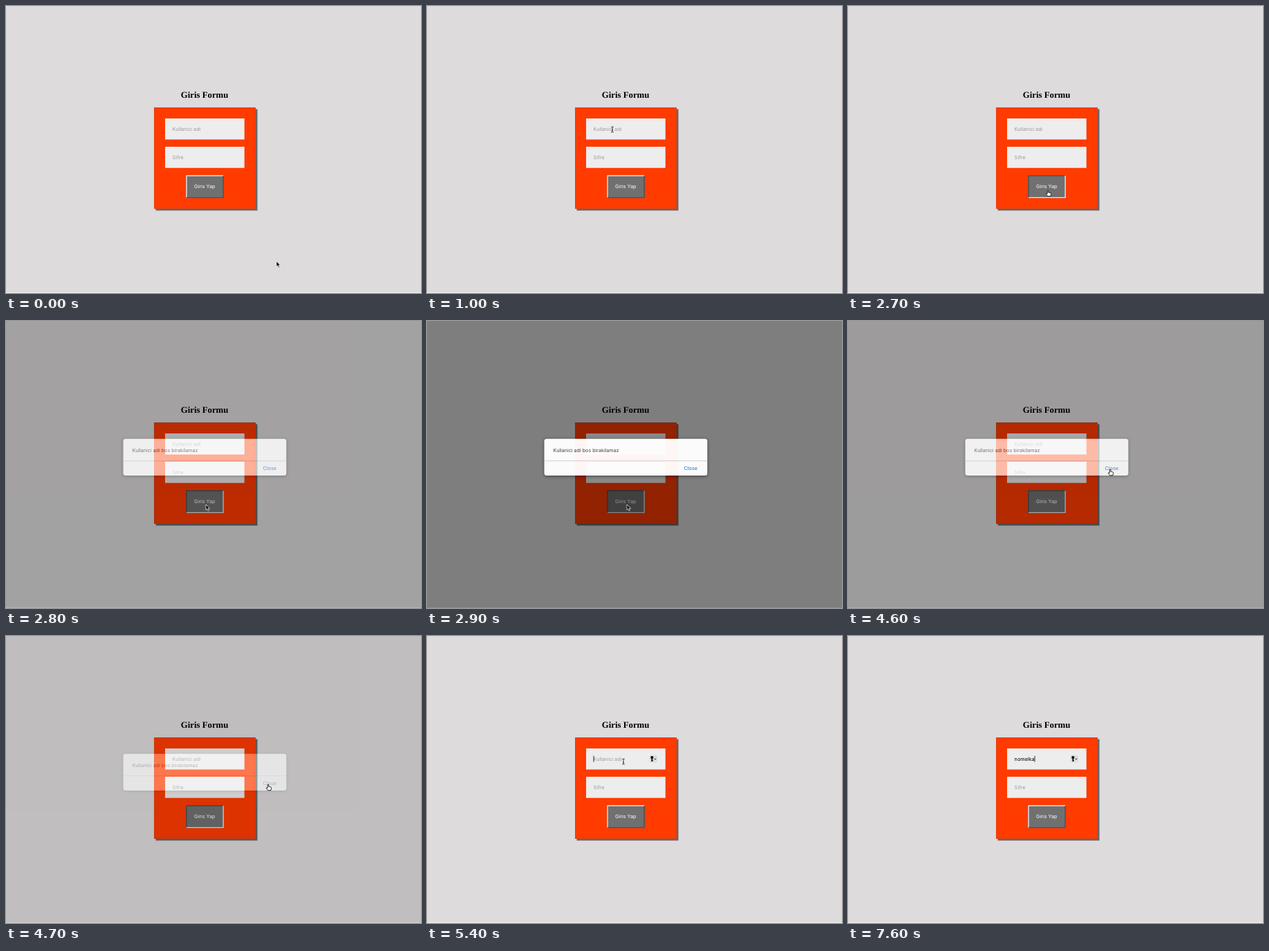
An HTML page that plays this animation: 600x416 px, repeating every 8000 ms.

```html
<!DOCTYPE html>
<html lang="tr">
<head>
<meta charset="utf-8">
<title>Giris Formu</title>
<style>
  html, body { margin: 0; width: 100%; height: 100%; overflow: hidden; background: #dddbdc; }
  svg { display: block; width: 600px; height: 416px; }
  text { font: 7.25px Inter, Roboto, sans-serif; text-rendering: geometricPrecision; white-space: pre; }
  .title { font: bold 12.8px "Liberation Serif", "Noto Serif", serif; }
  .hint { fill: #9a9a9a; }
  .field { fill: #eeedee; }
  .panel { filter: drop-shadow(0 1.5px 2.5px rgba(0, 0, 0, .55)); }
</style>
</head>
<body>
<svg viewBox="0 0 600 416">
  <rect width="600" height="416" fill="#dddbdc"/>
  <rect y="415" width="600" height="1" fill="#f3f2f3"/>
  <text class="title" x="252.8" y="132.7">Giris Formu</text>

  <rect x="216.5" y="149.5" width="147" height="147" fill="#686666"/>
  <rect x="214" y="147" width="147" height="147" fill="#a5503a"/>
  <rect x="214.3" y="147.7" width="146.4" height="146" fill="#ff3b00"/>
  <rect class="field" x="230" y="163" width="114.7" height="30.5"/>
  <rect class="field" x="230" y="204" width="114.7" height="30.7"/>
  <text class="hint" id="userHint" x="240.6" y="181">Kullanici adi</text>
  <text class="hint" x="240.6" y="222">Sifre</text>
  <text id="user" x="240.6" y="181"></text>
  <rect id="caret" y="173.6" width=".8" height="9"/>
  <g id="key">
    <rect x="321.8" y="172.8" width="10.8" height="10.4" rx="2" fill="#dcdcdc"/>
    <circle cx="325.3" cy="176" r="2.1"/>
    <path d="M325.3 177V182M325.8 180.2H326.7" stroke="#000" stroke-width="1.5"/>
    <path d="M328.5 177.6L330 179 331.5 177.6" fill="none" stroke="#222" stroke-width=".9"/>
  </g>

  <rect x="260.3" y="245.3" width="54.5" height="33" fill="#707070"/>
  <path id="bevelTop" d="M260.3 278.3V245.3H314.8L313.4 246.7H261.7V276.9Z"/>
  <path id="bevelBottom" d="M314.8 245.3V278.3H260.3L261.7 276.9H313.4V246.7Z"/>
  <text x="272" y="264.3" fill="#fff">Giris Yap</text>

  <g id="modal">
    <rect width="600" height="416" fill-opacity=".44"/>
    <rect class="panel" x="169.5" y="170.7" width="235.8" height="53.2" rx="3.5" fill="#fdfdfd"/>
    <path d="M169.5 202.8H405.3" stroke="#ccc" stroke-width=".9"/>
    <text x="182.6" y="190" fill="#3c3c3c" style="font-size:7.15px">Kullanici adi bos birakilamaz</text>
    <text id="close" x="371.5" y="216.2">Close</text>
  </g>

  <g id="pointer">
    <path id="arrow" d="M0 0V7.8L1.8 6.2 3.1 9.2 4.5 8.6 3.2 5.7H5.6Z" stroke="#fff" stroke-width=".7"/>
    <path id="hand" d="M-.8 .6Q0-.5 .8 .6V3.2L4 4Q4.8 4.3 4.6 5.3L3.9 8.8H-.3L-2.7 5.6Q-2.7 4.5-1.6 4.8L-.8 5.5Z"
      fill="#fff" stroke="#111" stroke-width=".9"/>
    <path id="beam" d="M-1.8-4Q0-4 0-3Q0-4 1.8-4M0-3V3M-1.8 4Q0 4 0 3Q0 4 1.8 4M-.9 1H.9"
      fill="none" stroke="#222" stroke-width=".9"/>
  </g>
</svg>
<script>
const $ = id => document.getElementById(id);
const LOOP = 8000, STEP = 100;
const NAME = "nomelka";
const keyTimes = [6200, 6400, 6700, 7000, 7200, 7500, 7600];

// time, shape, x, y of the hotspot
const moves = [
  [0, "arrow", 391, 370], [400, "arrow", 386, 352], [500, "arrow", 368, 310],
  [600, "arrow", 335, 248], [700, "beam", 300, 220], [800, "beam", 272, 190],
  [900, "beam", 262, 180], [1000, "beam", 268, 179],
  [2000, "beam", 272, 188], [2100, "beam", 290, 226], [2200, "hand", 309, 268], [2300, "hand", 289, 267],
  [2800, "arrow", 289, 266],
  [3600, "arrow", 284, 258], [3700, "arrow", 262, 228], [3800, "arrow", 232, 182],
  [3900, "arrow", 217, 156], [4000, "arrow", 228, 148], [4100, "arrow", 275, 158],
  [4200, "arrow", 335, 186], [4300, "hand", 372, 208], [4400, "hand", 379, 215],
  [4800, "arrow", 376, 212], [4900, "arrow", 355, 201], [5000, "beam", 330, 190],
  [5100, "beam", 305, 184], [5200, "beam", 290, 182], [5300, "beam", 284, 182],
  [6200, "none", 0, 0]
];
const fades = [[0, 0], [2800, .6], [2900, .97], [3000, 1], [4600, .66], [4700, .3], [4800, 0]];

const at = (list, t) => list.findLast(item => item[0] <= t);
const show = (id, on) => $(id).setAttribute("visibility", on ? "visible" : "hidden");

function draw(t) {
  const [, shape, x, y] = at(moves, t);
  for (const id of ["arrow", "hand", "beam"]) show(id, id === shape);
  $("pointer").setAttribute("transform", `translate(${x} ${y})`);

  $("modal").setAttribute("opacity", at(fades, t)[1]);
  $("close").setAttribute("fill", shape === "hand" ? "#1a56a8" : "#0a6fe0");

  const pressed = t >= 2700 && t < 4800;
  $("bevelTop").setAttribute("fill", pressed ? "#505050" : "#e6e6e6");
  $("bevelBottom").setAttribute("fill", pressed ? "#e6e6e6" : "#505050");

  const typed = keyTimes.filter(k => k <= t).length;
  $("user").textContent = NAME.slice(0, typed);
  show("userHint", !typed);
  show("key", t >= 5400);
  show("caret", t >= 5400 && (t < 5900 || typed));
  $("caret").setAttribute("x", 240.6 + (typed && $("user").getComputedTextLength()));
}

const start = performance.now();
function tick() {
  const t = (performance.now() - start) % LOOP;
  draw(Math.floor(t / STEP) * STEP);
  requestAnimationFrame(tick);
}
tick();
</script>
</body>
</html>
```
